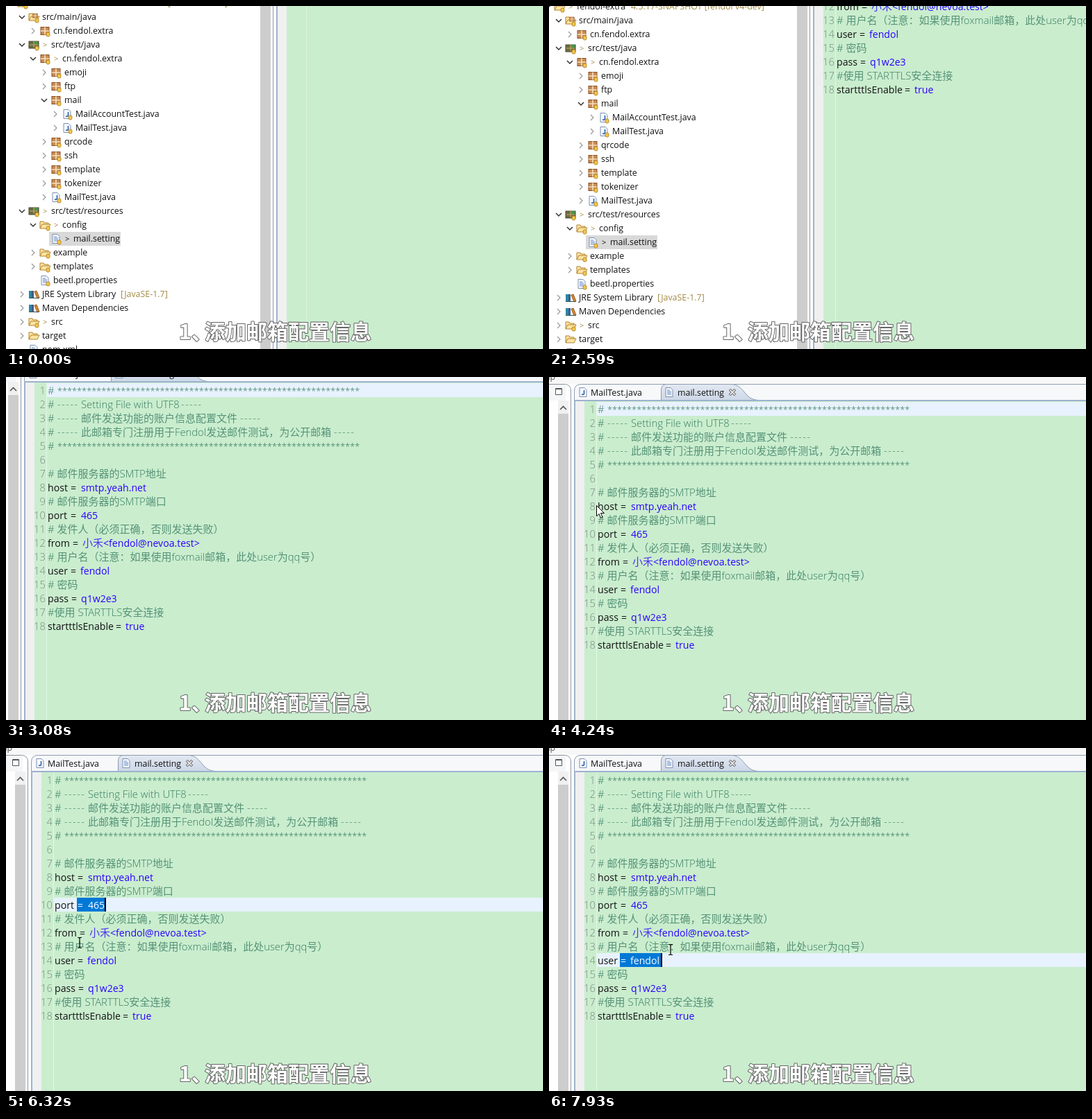
Animation, 773 px wide and 495 px high, one loop 8000 ms. Source, as an HTML page:

```html
<!DOCTYPE html>
<html lang="zh">
<head>
<meta charset="utf-8">
<style>
html, body { margin: 0; width: 100%; height: 100%; overflow: hidden; background: #fff; }
svg { display: block; width: 773px; height: 495px; }
text { white-space: pre; }
.ui { font: 12.4px "Open Sans", "Noto Sans", sans-serif; }
.code { font: 300 14.8px "Open Sans", "Noto Sans CJK SC", sans-serif; }
.setting { font-weight: 400; font-size: 14.1px; }
.han { font-size: 15px; fill-opacity: .78; }
.cap { font: 700 30px "Noto Sans CJK SC", sans-serif; fill: #fff; stroke: #666; stroke-width: 2; paint-order: stroke; stroke-linejoin: round; }
</style>
</head>
<body>
<svg id="stage" viewBox="0 0 773 495"></svg>
<script>
const LOOP = 8000, ROW = 20;
const BLACK = '#111', COMMENT = '#357a5f', VALUE = '#2a00ff', BROWN = '#a38a45';

const rect = (x, y, w, h, fill, more = '') =>
  `<rect x="${x}" y="${y}" width="${w}" height="${h}" fill="${fill}" ${more}/>`;
const path = (d, stroke, fill = 'none', w = 1) =>
  `<path d="${d}" stroke="${stroke}" fill="${fill}" stroke-width="${w}"/>`;
const esc = s => s.replace(/</g, '&lt;').replace(/>/g, '&gt;');
const text = (x, y, s, fill, cls = 'ui', more = '') =>
  `<text x="${x}" y="${y}" fill="${fill}" class="${cls}" ${more}>${s}</text>`;
const move = (x, y, s, id = '') => `<g id="${id}" transform="translate(${x} ${y})">${s}</g>`;

// Icons, centred on 0,0
const badge = rect(2, 2, 5, 6, '#f3c64a', 'rx="2" stroke="#a87a1c" stroke-width=".8"');
const page = path('M-5 -6.5H2L5 -3.5V6.5H-5Z', '#7d8fae', '#f6f9ff');
const box = rect(-6, -5.5, 12, 11, '#c98d55', 'stroke="#8a4f24"') +
  path('M-6 0H6M0 -5.5V5.5', '#f6dfbc', 'none', 1.6);
const folder = path('M-7 5V-5H-2L-1 -3H5V-1M-7 5L-4 -1H8L5 5Z', '#b3812a', '#fbe5a4');
const books = rect(-7, -5, 4, 11, '#2f86a8') + rect(-3, -5, 3, 11, '#3c5f86') +
  path('M1 -4L4 -5L8 5L5 6Z', '#9a5a1d', '#d58a36') + path('M-7 5.5H8', '#355');
const javaLetter = path('M1.5 -3V2Q1 4 -2 3', '#2d5fa8', 'none', 1.6);
const icons = {
  pkg: box + badge,
  src: folder + move(2, -2, `<g transform="scale(.55)">${box}</g>`) + badge,
  test: rect(-7, -5, 14, 10, '#6d6a3f', 'stroke="#4b4a2c"') + path('M-6 0H6M0 -5V4', '#cfae6a') + rect(1, -5, 5, 4, '#3c9a4d') + badge,
  folder: folder + badge,
  plain: folder,
  file: page + path('M-3 -3H1M-3 -1H3M-3 1H3M-3 3H3', '#6c8fc6') + badge,
  java: page + javaLetter + badge,
  lib: books
};

// depth, arrow (v open, > closed, - none), icon, label, changed mark, suffix, suffix x
const tree = [
  [-1, 'v', 'folder', 'fendol-extra', 1, '4.5.17-SNAPSHOT [fendol v4-dev]', 127],
  [0, 'v', 'src', 'src/main/java'],
  [1, '>', 'pkg', 'cn.fendol.extra'],
  [0, 'v', 'test', 'src/test/java', 1],
  [1, 'v', 'pkg', 'cn.fendol.extra', 1],
  [2, '>', 'pkg', 'emoji'],
  [2, '>', 'pkg', 'ftp'],
  [2, 'v', 'pkg', 'mail'],
  [3, '>', 'java', 'MailAccountTest.java'],
  [3, '>', 'java', 'MailTest.java'],
  [2, '>', 'pkg', 'qrcode'],
  [2, '>', 'pkg', 'ssh'],
  [2, '>', 'pkg', 'template'],
  [2, '>', 'pkg', 'tokenizer'],
  [2, '>', 'java', 'MailTest.java'],
  [0, 'v', 'test', 'src/test/resources', 1],
  [1, 'v', 'folder', 'config', 1],
  [2, '-', 'file', 'mail.setting', 1],
  [1, '>', 'folder', 'example'],
  [1, '>', 'folder', 'templates'],
  [1, '-', 'file', 'beetl.properties'],
  [0, '>', 'lib', 'JRE System Library', 0, '[JavaSE-1.7]', 165],
  [0, '>', 'lib', 'Maven Dependencies'],
  [0, '>', 'folder', 'src', 1],
  [0, '>', 'plain', 'target'],
  [0, '-', 'file', 'pom.xml']
];
const treeRow = ([depth, arrow, icon, label, mark, suffix, sx], i) => {
  const x = 16 * depth, y = ROW * i - 4;
  const tip = arrow === 'v' ? path(`M${x + 19} ${y - 2}l4 4l4 -4`, '#333', 'none', 1.5)
    : arrow === '>' ? path(`M${x + 21} ${y - 4}l4 4l-4 4`, '#999', 'none', 1.2) : '';
  return tip + move(x + 40, y, icons[icon]) +
    (mark ? text(x + 53, y + 4, '&gt;', label === 'mail.setting' ? BLACK : BROWN, 'ui', 'style="font-size:11px"') : '') +
    text(x + (mark ? 65 : 52), y + 4, label, BLACK) +
    (suffix ? text(sx, y + 4, suffix, BROWN) : '');
};

// Comments are strings; settings are [key, x of =, x of value, value]
const file = [
  '*', '-Setting File with UTF8|262', '-邮件发送功能的账户信息配置文件|347',
  '-此邮箱专门注册用于Fendol发送邮件测试，为公开邮箱|482', '*', '',
  '# 邮件服务器的SMTP地址', ['host', 103, 118, 'smtp.yeah.net'],
  '# 邮件服务器的SMTP端口', ['port', 103, 118, '465'],
  '# 发件人（必须正确，否则发送失败）', ['from', 106, 120, '小禾<fendol@nevoa.test>'],
  '# 用户名（注意：如果使用foxmail邮箱，此处user为qq号）', ['user', 103, 117, 'fendol'],
  '# 密码', ['pass', 104, 118, 'q1w2e3'],
  '#使用 STARTTLS安全连接', ['startttlsEnable', 168, 182, 'true']
];
const mixed = s => esc(s).replace(/[\u3000-\uffff]+/g, '<tspan class="han">$&</tspan>');
const codeRow = (line, i, white) => {
  const y = 52 + ROW * i;
  const put = (x, s, fill, cls = '', more = '') => text(x, y, mixed(s), white || fill, 'code ' + cls, more);
  if (Array.isArray(line)) {
    const [key, xe, xv, val] = line;
    return put(70, key, BLACK, 'setting') + put(xe, '=', BLACK, 'setting') + put(xv, val, VALUE, 'setting');
  }
  if (line === '*') return put(70, '#', COMMENT) + put(84, '*'.repeat(62), COMMENT, '', 'style="font-size:12.75px"');
  if (line[0] === '-') {
    const [body, end] = line.slice(1).split('|');
    const dash = x => put(x, '-----', COMMENT, '', 'letter-spacing="1.3"');
    return put(70, '#', COMMENT) + dash(84) + put(118, body, COMMENT) + dash(end);
  }
  return put(70, line, COMMENT);
};
const code = white => file.map((line, i) => codeRow(line, i, white)).join('');
const numbers = file.map((_, i) => text(67, 52 + ROW * i, i + 1, '#778a7c', 'code', 'text-anchor="end"')).join('');

const panel =
  rect(-400, -60, 1500, 70, '#f7f7f7') + text(-6, 4, 'np', '#555') +
  path('M-400 10.5H22Q31.5 10.5 31.5 20V900H-400', '#8d95a1', '#fff') +
  rect(-400, 11, 424, 23, '#f5f6f8') +
  path('M9.5 16.5H18.5V25.5H9.5ZM9.5 17.5H18.5', '#555', '#fff') +
  rect(13, 34, 15, 20, '#f0f0f0') + path('M16 47l4.500 -4.500l4.500 4.500', '#555', 'none', 1.6) +
  rect(13, 53, 15, 850, '#cdcdcd');

const editor =
  path('M36.5 900V20Q36.5 10.5 46 10.5H1100V900', '#8d9db3', '#f7f8fa') +
  path('M161.500 35V18Q162 10.5 169 10.5H262C282 10.5 280 33 302 33.5Z', '#8d9db3', 'url(#tab)') +
  rect(38, 35, 13, 870, '#f0f0f0') + rect(51, 35, 1050, 870, '#caedce') +
  path('M37 34H1100M37 33V900', '#9db2cd', 'none', 2) +
  move(49, 22, page + javaLetter) + text(60, 27, 'MailTest.java', BLACK) +
  move(173, 22, page + path('M-3 -3H1M-3 -1H3M-3 1H3M-3 3H3', '#6c8fc6')) + text(185, 27, 'mail.setting', BLACK) +
  path('M260 18l8 8M268 18l-8 8', '#666', 'none', 3.6) + path('M260.500 18.500l7 7M267.500 18.500l-7 7', '#fff', 'none', 1.6) +
  rect(79, 36, 1, 870, '#dcf5df', 'id="blank"') +
  `<g id="doc">${rect(68, 36, 1, 870, '#e2f7e4')}${rect(69, 36, 1030, ROW, '#e8f2fe', 'id="current"')}
  ${numbers}${code()}
  <g id="pick">${rect(102, 0, 0, ROW, '#0078d7', 'id="fill"')}
  <g clip-path="url(#clip)">${code('#fff')}</g>${rect(0, 0, 2, ROW, '#000', 'id="caret"')}</g></g>`;

const $ = id => document.getElementById(id);
$('stage').innerHTML = `<defs>
  <linearGradient id="tab" x2="0" y2="1"><stop stop-color="#e3e9f2"/><stop offset="1" stop-color="#cbd6e6"/></linearGradient>
  <clipPath id="clip">${rect(102, 0, 0, ROW, '#000', 'id="window"')}</clipPath></defs>` +
  move(0, 0, rect(-400, -400, 1900, 1500, '#fff') + move(353, -271, panel) +
    rect(62, 326, 103, ROW, '#d9d9d9', 'id="item"') + tree.map(treeRow).join('') +
    move(353, -271, editor), 'camera') +
  text(249, 481, '1、', '#fff', 'cap') + text(286, 481, '添加邮箱配置信息', '#fff', 'cap') +
  move(0, 0, path('M.5 .5V16L4 12.500L6.500 18.500L9 17.500L6.500 11.500H11.500Z', '#000', '#fff'), 'arrow') +
  move(0, 0, path('M-3 -7.500H-1L0 -6.500L1 -7.500H3M0 -6.500V6.500M-3 7.500H-1L0 6.500L1 7.500H3', '#000', 'none', 1.2), 'beam');

// Keyframes: time, x, y
const camera = [[2580, 0, 0], [2590, -9, 5], [2740, -75, 45], [3080, -363, 244], [3390, -353, 271]];
const pointer = [
  [140, 671, 500], [150, 671, 478], [380, 650, 404], [530, 646, 402], [800, 392, 380], [1070, 118, 330],
  [1650, 118, 330], [2070, 347, 33], [2150, 347, 24], [3450, 98, 131], [3460, 98, 131], [3760, 64, 165],
  [4000, 66, 188], [4240, 68, 185], [4320, 70, 186], [4860, 102, 187], [5010, 102, 187], [5400, 213, 187],
  [5500, 213, 188], [5780, 103, 222], [5860, 102, 222], [6120, 143, 225], [6320, 106, 281], [6430, 103, 268],
  [6630, 210, 267], [6850, 288, 267], [7200, 102, 307], [7250, 102, 307], [7470, 163, 307], [7550, 168, 307],
  [7640, 196, 335], [7740, 130, 362], [7800, 103, 345], [7930, 175, 291]
];
// Dragged selections: line, start, end, right edge
const drags = [[8, 5010, 5400, 213], [10, 5860, 6120, 143], [12, 6430, 6850, 288], [14, 7250, 7470, 162]];

const clamp = v => Math.max(0, Math.min(1, v));
function at(keys, t) {
  const i = keys.findIndex(k => k[0] > t);
  if (i < 0) return keys[keys.length - 1].slice(1);
  if (i === 0) return keys[0].slice(1);
  const a = keys[i - 1], b = keys[i], p = (t - a[0]) / (b[0] - a[0]);
  return [a[1] + (b[1] - a[1]) * p, a[2] + (b[2] - a[2]) * p];
}
const set = (id, attrs) => { for (const k in attrs) $(id).setAttribute(k, attrs[k]); };
const show = (id, on) => set(id, { visibility: on ? 'visible' : 'hidden' });
const place = (id, [x, y]) => set(id, { transform: `translate(${Math.round(x)} ${Math.round(y)})` });

function draw(t) {
  place('camera', at(camera, t));
  const pos = at(pointer, t);
  place('arrow', pos);
  place('beam', pos);
  const seen = t >= 150 && t < 2220 || t >= 3460;
  show('arrow', seen && t < 4400);
  show('beam', seen && t >= 4400);

  set('item', { fill: t > 1000 && t < 1720 ? '#cce8ff' : '#d9d9d9' });
  const open = t >= 1380;
  set('doc', { display: open ? 'inline' : 'none' });
  show('blank', !open);

  const drag = drags.filter(d => d[1] <= t).pop();
  set('pick', { display: drag ? 'inline' : 'none' });
  if (!drag) return set('current', { y: 36 });
  const [line, start, end, right] = drag;
  const y = 16 + ROW * line, width = (right - 102) * clamp((t - start) / (end - start));
  set('current', { y });
  for (const id of ['fill', 'window']) set(id, { y, width });
  set('caret', { x: 101 + width, y });
}
function tick(now) {
  draw(now % LOOP);
  requestAnimationFrame(tick);
}
draw(0);
requestAnimationFrame(tick);
</script>
</body>
</html>
```
